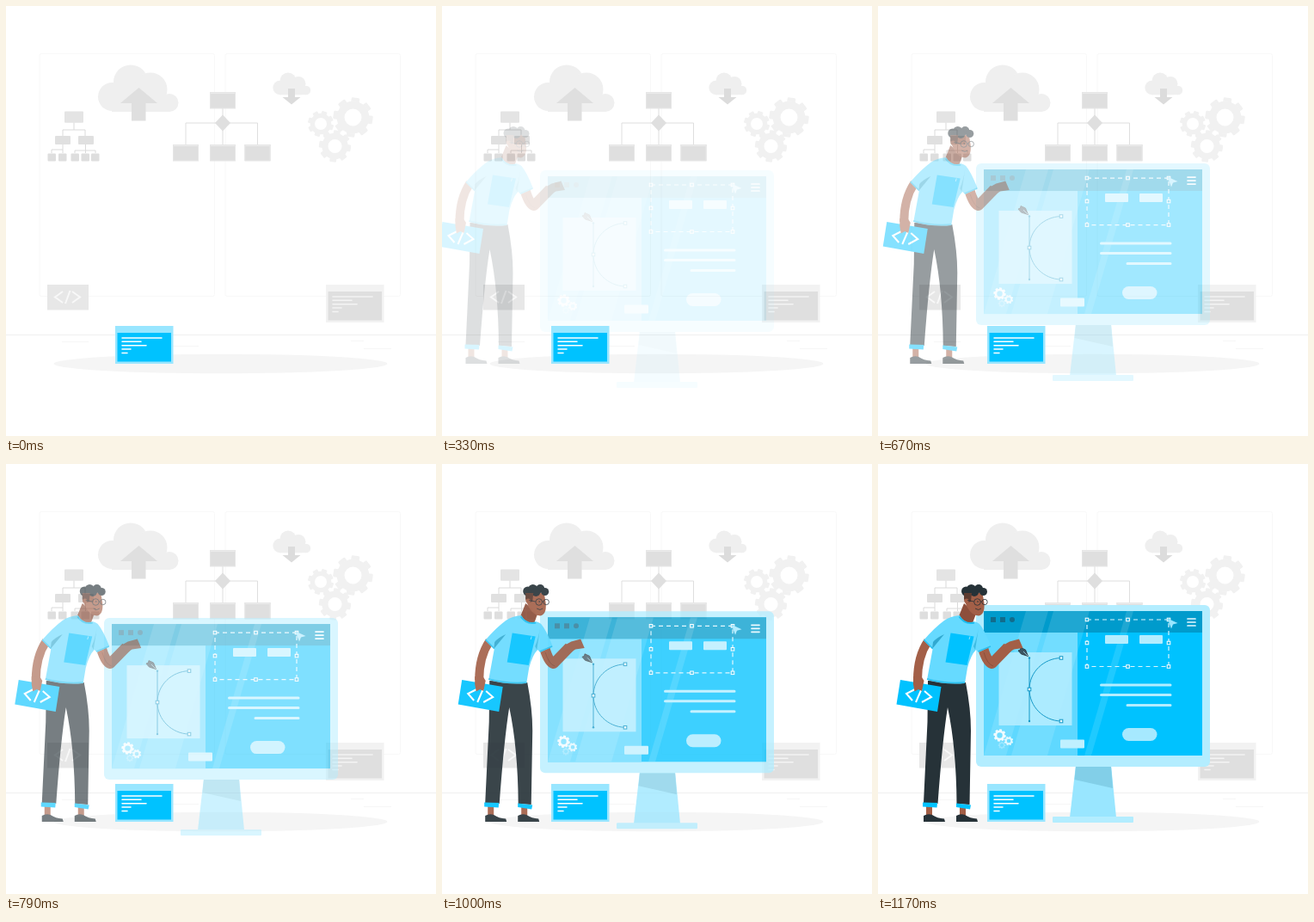
Animation, 500 px wide and 500 px high, one loop 1210 ms. Source, as an HTML page:

```html
<!DOCTYPE html>
<html lang="en">
<head>
<meta charset="utf-8">
<title>Interface design</title>
<style>
  html, body { margin: 0; width: 100%; height: 100%; overflow: hidden; background: #fff; }
  svg { display: block; width: 100vw; height: 100vh; }
</style>
</head>
<body>
<svg id="stage" viewBox="0 0 500 500"></svg>
<script>
const BLUE = '#00c2ff', PALE = '#b3edff', DARK = '#263238', SKIN = '#a35f47', SKIN_SHADE = '#8d4f3b';

const rect = (x, y, w, h, fill, rx = 0, extra = '') =>
  `<rect x="${x}" y="${y}" width="${w}" height="${h}" rx="${rx}" fill="${fill}" ${extra}/>`;
const circle = (x, y, r, fill, extra = '') =>
  `<circle cx="${x}" cy="${y}" r="${r}" fill="${fill}" ${extra}/>`;
const shape = (d, fill, extra = '') => `<path d="${d}" fill="${fill}" ${extra}/>`;
const line = (d, color, width = 1, extra = '') =>
  `<path d="${d}" fill="none" stroke="${color}" stroke-width="${width}" ${extra}/>`;
const round = 'stroke-linecap="round" stroke-linejoin="round"';

function gear(x, y, r, hole, color, turn = 0) {
  const body = r * 0.82, tooth = r * 0.42;
  let teeth = '';
  for (let i = 0; i < 8; i++) {
    teeth += rect(-tooth / 2, -r, tooth, r - hole - 1, color, r * 0.06, `transform="rotate(${turn + i * 45})"`);
  }
  return `<g transform="translate(${x} ${y})">${teeth}` +
    circle(0, 0, (body + hole) / 2, 'none', `stroke="${color}" stroke-width="${body - hole}"`) + '</g>';
}

function codeWindow(x, y, frame, fill, text) {
  const widths = [46, 22, 28, 10, 6];
  return rect(x, y, 67.5, 44, frame) + rect(x + 2.5, y + 8, 62.5, 33.5, fill) +
    widths.map((w, i) => line(`M${x + 8} ${y + 14 + i * 4.35}h${w}`, text, 1.5, round)).join('');
}

function cloud(blobs, bottom, color) {
  const first = blobs[0], last = blobs[blobs.length - 1];
  const top = Math.min(first[1], last[1]);
  return blobs.map(b => circle(...b, color)).join('') +
    rect(first[0], top, last[0] - first[0], bottom - top, color);
}

function background() {
  const small = [48.5, 61, 75.5, 87.5, 99].map(x => rect(x, 171.5, 9.5, 9, '#dedede', 1)).join('');
  const box = (x, y) => rect(x, y, 30, 19, '#dfdfdf') + rect(x, y, 30, 2, '#ebebeb') +
    rect(x + .5, y + .5, 29, 18.5, 'none', 0, 'stroke="#e6e6e6"');
  return rect(39, 55.5, 203.5, 282, '#fff', 2, 'stroke="#f8f8f8"') +
    rect(255, 55.5, 203.5, 282, '#fff', 2, 'stroke="#f8f8f8"') +
    line('M0 382.5H500', '#f0f0f0') +
    line('M65 390.5h31M193 395.5h31M401 389.5h15M416 398.5h32', '#f6f6f6') +
    `<ellipse cx="249.5" cy="416" rx="194" ry="11.3" fill="#f5f5f5"/>` +
    cloud([[123.5, 105.5, 16.5], [145, 88.5, 20], [168, 97, 19.5], [190, 112.5, 10.5]], 123, '#efefef') +
    rect(123, 94, 55, 29, '#efefef') +
    shape('M154.500 95L176 113H162.500V133.500H146V113H133Z', '#dfdfdf') +
    cloud([[318.500, 95, 8.2], [328, 87, 9.500], [340, 90.500, 8.500], [349, 98, 5.200]], 103.200, '#efefef') +
    rect(318, 90, 26, 13.200, '#efefef') +
    shape('M328 96H336V106H342.500L332 114.500 321.500 106H328Z', '#dcdcdc') +
    line('M79 135v9M66 151v-7h26v7M66 160v11M53 171v-4h13M92.500 160v11M80 171v-3h24v3', '#dadada') +
    rect(68, 122.500, 22, 13.300, '#e4e4e4', 1) +
    rect(57, 151, 18, 10, '#e0e0e0', 1) + rect(84, 151, 18, 10, '#e0e0e0', 1) + small +
    line('M252 118v43M209 161v-25h83.500v25', '#dedede') +
    shape('M252 126.500L261 136 252 145.500 243 136Z', '#dfdfdf') +
    box(237, 100) + box(194, 161) + box(237, 161) + box(277.500, 161) +
    gear(403.500, 129.500, 23, 10, '#f1f1f1', 8) +
    gear(366, 137, 15, 7, '#f1f1f1', 18) +
    gear(382.500, 163, 18.500, 8, '#f1f1f1', 8) +
    rect(48, 324, 48, 29.500, '#e7e7e7') +
    line('M66 332L57 338.500 66 345M74.500 331L69 346M77 332L86 338.500 77 345', '#f8f8f8', 2) +
    codeWindow(372, 324, '#f2f2f2', '#dfdfdf', '#f4f4f4');
}

function monitor() {
  const handle = (x, y, color, fill) => rect(x - 1.8, y - 1.8, 3.6, 3.6, fill, 0, `stroke="${color}"`);
  const corners = [[243, 181], [290.500, 181], [338, 181], [243, 208], [338, 208],
    [243, 235.500], [290.500, 235.500], [338, 235.500]];
  const nodes = [[213, 225.500], [176, 262], [213, 299]];
  const glare = (left, width) => shape(`M${left} 171h${width}l-49 168h${-width}Z`, '#fff', 'opacity=".12"');
  return shape('M230 350H271L277 411H223Z', '#99e6ff') +
    shape('M230 352H271L273 377 228.500 367Z', '#82cfe8') +
    rect(203, 410, 94, 7, PALE, 1) +
    rect(114, 164, 272, 188, PALE, 6) +
    rect(123, 171, 254, 168, BLUE) +
    rect(123, 196, 109, 143, '#5fd8ff') +
    rect(123, 171, 254, 25, '#009bcc') +
    `<g clip-path="url(#screen)">${glare(172, 26)}${glare(204, 42)}${glare(289, 8)}</g>` +
    rect(131, 178, 6, 6, '#116c8c') + rect(142, 178, 6, 6, '#116c8c') + circle(156, 181, 3, '#116c8c') +
    line('M360 180h9M360 184h9M360 188h9', '#e6f9ff', 1.7, round) +
    rect(243, 181, 95, 54.500, 'none', 0, 'stroke="#d9f6ff" stroke-width="1.2" stroke-dasharray="5 4"') +
    corners.map(([x, y]) => handle(x, y, '#fff', '#20b4e4')).join('') +
    shape('M336.500 179.500L348.500 185 343 186.500 341 191.500Z', '#99e6ff') +
    rect(264, 199, 27, 10, PALE, 1) + rect(304, 199, 27, 10, PALE, 1) +
    line('M259.500 257H340M259.500 268.500H340M290 280.500H340', PALE, 3, round) +
    rect(284, 307, 40.500, 15, '#a6e9ff', 7.500) +
    rect(212, 320.500, 28, 10, '#bff0ff', 1) +
    rect(140.500, 219, 85, 85, PALE, 0, 'opacity=".9"') +
    line('M176 225V299M213 225.500C192.500 226 176 242 176 262S192.500 298.500 213 299', '#1599c8') +
    circle(176, 225.500, 1.2, '#1599c8') + circle(176, 299, 1.2, '#1599c8') +
    nodes.map(([x, y]) => handle(x, y, '#1599c8', '#e6faff')).join('') +
    gear(141.500, 315.500, 7.200, 3.200, '#f0fbff', 10) +
    gear(152, 322, 5.200, 2.300, '#e0f8ff', 20) +
    gear(144, 327, 4.200, 2, '#99e6ff') +
    shape('M163 217L165.500 216 166 213.500 171.500 216 174.500 223.500 166.500 221Z', '#3b5662',
      `stroke="${DARK}" stroke-width=".8"`) +
    line('M174 223L169 218', '#b3edff', .7);
}

function person() {
  const shoe = x => shape(`M${x} 409Q${x + 5} 406 ${x + 10} 408 ${x + 16} 412 ${x + 24} 412.500L${x + 25} 416H${x}Z`, DARK);
  const hair = [[102.500, 148, 5.500], [108.500, 145.500, 5.500], [117, 145, 5], [122.500, 148.500, 4.500], [112, 149, 5]];
  const legs = rect(56, 398, 7, 11, SKIN) + rect(95, 399, 7, 11, SKIN) + shoe(53) + shoe(91) +
    shape('M58 252L102 254Q108 285 108 310L106.500 396 91.500 395Q91 330 81 283 75 320 69.500 395L53 394 57.500 300Z', DARK) +
    shape('M52 393.500L69 394 68.500 399.500 52 398.500Z', BLUE) +
    shape('M91 394.500L108 396.500 107 401.500 91 399Z', BLUE);
  const head = shape('M100 162L114 174 110 185Q99 185 94 177Z', SKIN_SHADE) +
    shape('M101 150H121.500L123.500 162Q124.500 175 117 176.500 109 176 104 167L100 158Z', SKIN) +
    hair.map(c => circle(...c, DARK)).join('') +
    shape('M100 150H109L108 160 104 161 100 157Z', '#5d3b30') +
    circle(103, 159, 2.600, SKIN) +
    circle(115.500, 160.500, 3.800, 'none', `stroke="${DARK}" stroke-width=".8"`) +
    circle(124, 160.500, 3.200, 'none', `stroke="${DARK}" stroke-width=".8"`) +
    line('M111.700 160L104 158.500M119.300 160H121', DARK, .8) +
    circle(116, 160, .8, DARK) + line('M113 168Q117 171 120 168', DARK, .8);
  const rightArm = line('M122 214Q127 231 132.500 232L151 213', SKIN, 12, 'stroke-linejoin="round"') +
    shape('M145 211L153 206.500 164 203.500 168.500 214 158 215.500 151 220Z', SKIN) +
    line('M123 219Q127 233 134 235', SKIN_SHADE, 1);
  const shirt = shape('M95 176Q84 177 77 182 66 190 53 205L63.500 215.500 57 251Q78 257 101 255L104 237Q108 222 114 216L117 219 131.500 212Q124 193 118 186 112 182 111 184 101 187 95 176Z', '#66daff') +
    shape('M63 215L77 198Q68 202 64 207Z', '#31a9d0') +
    shape('M113 216L117 190Q115 203 111 212Z', '#3dbbe2') +
    line('M94.500 177.500Q101 187 112 184.500', '#18bdf0', 2) +
    line('M57 250Q79 256 101 254M116.500 218L131 212M53.500 204.500L63.500 214.500', '#2abfee', 1.500) +
    shape('M84.500 196.500L111.500 200.500 103.500 234 78.500 230.500Z', BLUE) +
    line('M107 200.500L106 204', '#8ae3ff', 1);
  const leftArm = line('M58 206Q46 224 46 251', SKIN, 10) +
    shape('M26 251L73.500 259 69 288 21.500 279.500Z', BLUE) +
    line('M43 262L33 267 40 275M50.500 262L44 277M54 264L62 271 51 277', '#fff', 2) +
    shape('M41 247L51 248 53.500 252 51 264 47 262 42.500 264.500 41 256Z', SKIN);
  return legs + rightArm + head + leftArm + shirt;
}

document.getElementById('stage').innerHTML =
  '<defs><clipPath id="screen"><rect x="123" y="171" width="254" height="168"/></clipPath></defs>' +
  background() + `<g id="monitor">${monitor()}</g><g id="person">${person()}</g>` +
  codeWindow(127, 372, '#99e6ff', BLUE, '#fff');

const LOOP = 1210, STEP = 1000 / 24, FIRST = 3, SLIDE = 30;
const monitorLayer = document.getElementById('monitor');
const personLayer = document.getElementById('person');

// Gentle ease-in: a blend of linear and quadratic.
function progress(step, length, linear) {
  const u = Math.min(1, Math.max(0, (step - FIRST) / length));
  return linear * u + (1 - linear) * u * u;
}

function place(layer, p, dx, dy) {
  layer.setAttribute('opacity', p);
  layer.setAttribute('transform', `translate(${dx * (1 - p)} ${dy * (1 - p)})`);
}

function render(time) {
  const t = time % LOOP;
  const step = Math.floor((Math.floor(t / 10) * 10 + 4.9) / STEP);
  place(monitorLayer, progress(step, 25, .38), 0, SLIDE);
  place(personLayer, progress(step, 22.5, .58), -SLIDE, 0);
}

const start = performance.now();
function tick() {
  render(performance.now() - start);
  requestAnimationFrame(tick);
}
tick();
</script>
</body>
</html>
```
